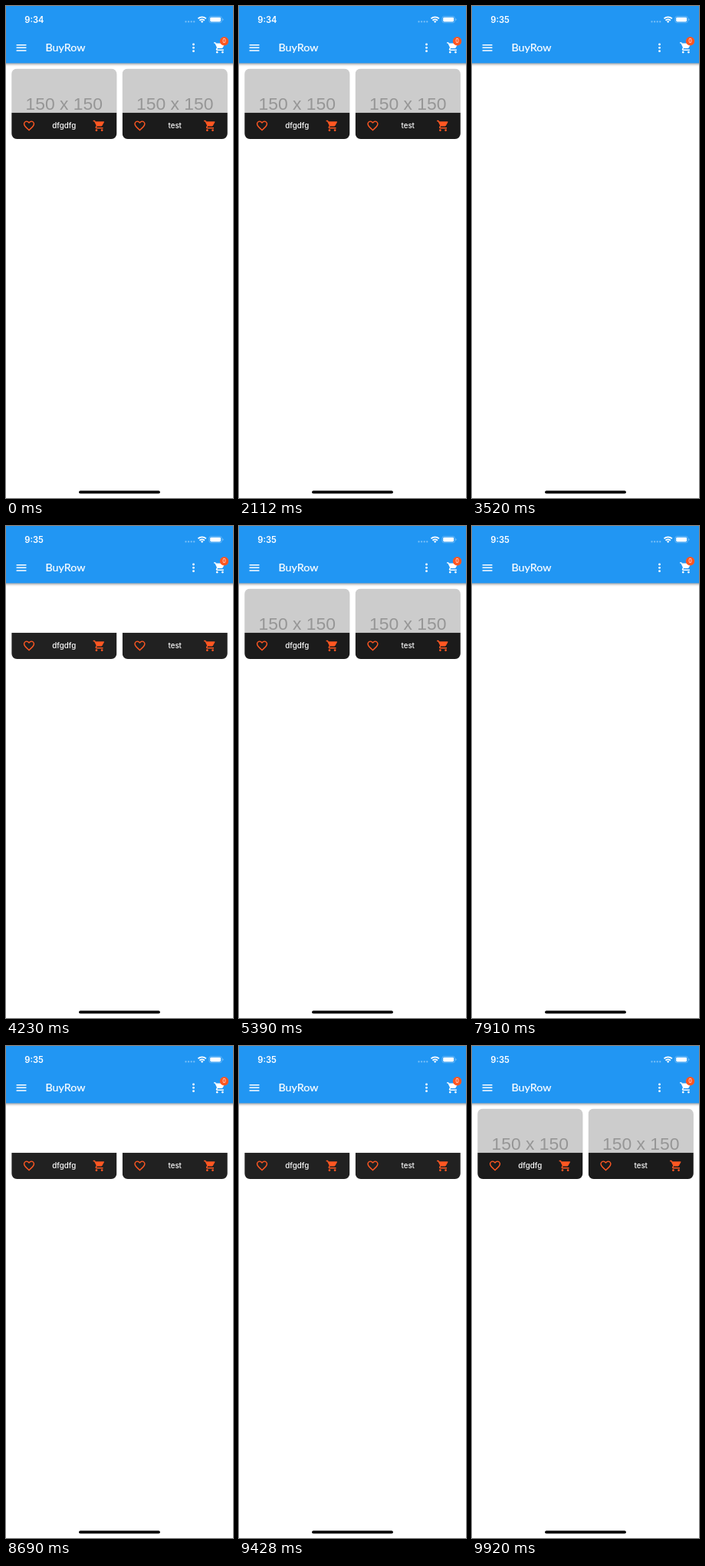
Animation of 296x640 px, one loop 9960 ms. Source, as an HTML page:

```html
<!DOCTYPE html>
<html lang="en">
<head>
<meta charset="utf-8">
<title>Shop grid reload</title>
<style>
  html, body { margin: 0; width: 100%; height: 100%; overflow: hidden; background: #fff; }
  svg { display: block; width: 100%; height: 100%; }
  text { font-family: Inter, Roboto, sans-serif; fill: #fff; }
  .time { font-size: 15.6px; font-weight: 600; }
  .title { font: 400 20px Lato, sans-serif; stroke: #fff; stroke-width: .3; }
  .label { font-size: 13.6px; font-weight: 500; text-anchor: middle; }
  .badge { font-size: 10px; text-anchor: middle; }
  .size { font: 32px "Liberation Sans", Arial, sans-serif; fill: #969696; text-anchor: middle; }
  .accent { fill: #ff5722; }
  .bar { filter: drop-shadow(0 2px 2.5px rgba(0, 0, 0, .4)); }

  .before, .after, .foot, .photo { animation: 9960ms step-end infinite; }
  .before { animation-name: before; }
  .after { animation-name: after; }
  .foot { animation-name: foot; }
  .photo { animation-name: photo; }

  @keyframes before { 0% { opacity: 1 } 35.341%, 100% { opacity: 0 } }
  @keyframes after { 0% { opacity: 0 } 35.341%, 100% { opacity: 1 } }
  @keyframes foot {
    0%, 42.470%, 87.249%, 100% { opacity: 1 }
    35.341%, 79.418% { opacity: 0 }
  }
  @keyframes photo {
    0%, 54.116%, 99.598%, 100% { opacity: 1 }
    35.341%, 79.418% { opacity: 0 }
  }
</style>
</head>
<body>
<svg viewBox="0 0 414 895.135" preserveAspectRatio="xMinYMin slice">
  <defs>
    <clipPath id="round"><rect width="192" height="128" rx="10"/></clipPath>
    <path id="cart" transform="translate(-12 -12)" d="M7 18c-1.1 0-1.99.9-1.99 2S5.9 22 7 22s2-.9 2-2-.9-2-2-2zM1 2v2h2l3.6 7.59-1.35 2.45c-.16.28-.25.61-.25.96 0 1.1.9 2 2 2h12v-2H7.42c-.14 0-.25-.11-.25-.25l.03-.12.9-1.63h7.45c.75 0 1.41-.41 1.75-1.03l3.58-6.49A1 1 0 0 0 20 4H5.21l-.94-2H1zm16 16c-1.1 0-1.99.9-1.99 2s.89 2 1.99 2 2-.9 2-2-.9-2-2-2z"/>
    <path id="heart" transform="translate(-12 -12)" d="M16.5 3c-1.74 0-3.41.81-4.5 2.09C10.91 3.81 9.24 3 7.5 3 4.42 3 2 5.42 2 8.5c0 3.78 3.4 6.86 8.55 11.54L12 21.35l1.45-1.32C18.6 15.36 22 12.28 22 8.5 22 5.42 19.58 3 16.5 3zm-4.4 15.55l-.1.1-.1-.1C7.14 14.24 4 11.39 4 8.5 4 6.5 5.5 5 7.5 5c1.54 0 3.04.99 3.57 2.36h1.87C13.46 5.99 14.96 5 16.5 5c2 0 3.5 1.5 3.5 3.5 0 2.89-3.14 5.74-7.9 10.05z"/>
    <g id="photo">
      <rect width="192" height="128" fill="#ccc"/>
      <text class="size" x="96" y="75.5">150 x 150</text>
    </g>
    <g id="foot">
      <rect y="80" width="192" height="48" fill="#000" fill-opacity=".87"/>
      <use href="#heart" class="accent" x="32" y="104"/>
      <use href="#cart" class="accent" x="160" y="104"/>
    </g>
  </defs>

  <rect class="bar" x="-10" y="-10" width="434" height="114" fill="#2196f3"/>

  <!-- status bar -->
  <text class="time before" x="34" y="30.6">9:34</text>
  <text class="time after" x="34" y="30.6">9:35</text>
  <g fill="#fff">
    <g opacity=".4">
      <circle cx="328" cy="28.5" r="1.6"/><circle cx="333" cy="28.5" r="1.6"/>
      <circle cx="338" cy="28.5" r="1.6"/><circle cx="343" cy="28.5" r="1.6"/>
    </g>
    <g fill="none" stroke="#fff" stroke-width="2.5">
      <path d="M350.3 23a10.6 10.6 0 0 1 14.6 0"/>
      <path d="M353.1 26.2a6.5 6.5 0 0 1 9 0"/>
    </g>
    <path d="M357.6 30.6l-2.4-2.5a3.6 3.6 0 0 1 4.8 0z"/>
    <rect x="370.5" y="18.8" width="23" height="11.6" rx="3.4" fill="none" stroke="#fff" stroke-opacity=".4"/>
    <rect x="372.3" y="20.6" width="19.4" height="8" rx="1.9"/>
    <path d="M395 22.8q1.6.6 1.6 1.9t-1.6 1.9z" opacity=".45"/>
  </g>

  <!-- app bar -->
  <g fill="#fff">
    <path d="M19 70h18v2H19zM19 75h18v2H19zM19 80h18v2H19z"/>
    <circle cx="342" cy="70" r="2"/><circle cx="342" cy="76" r="2"/><circle cx="342" cy="82" r="2"/>
    <use href="#cart" x="390" y="76"/>
  </g>
  <text class="title" x="72" y="83.2">BuyRow</text>
  <circle class="accent" cx="398" cy="64" r="8"/>
  <text class="badge" x="398" y="67.7">0</text>

  <!-- product grid -->
  <g transform="translate(10 114)" clip-path="url(#round)">
    <use href="#photo" class="photo"/>
    <g class="foot"><use href="#foot"/><text class="label" x="96" y="108.4">dfgdfg</text></g>
  </g>
  <g transform="translate(212 114)" clip-path="url(#round)">
    <use href="#photo" class="photo"/>
    <g class="foot"><use href="#foot"/><text class="label" x="96" y="108.4">test</text></g>
  </g>

  <rect x="133" y="882" width="148" height="5" rx="2.5"/>
</svg>
</body>
</html>
```
